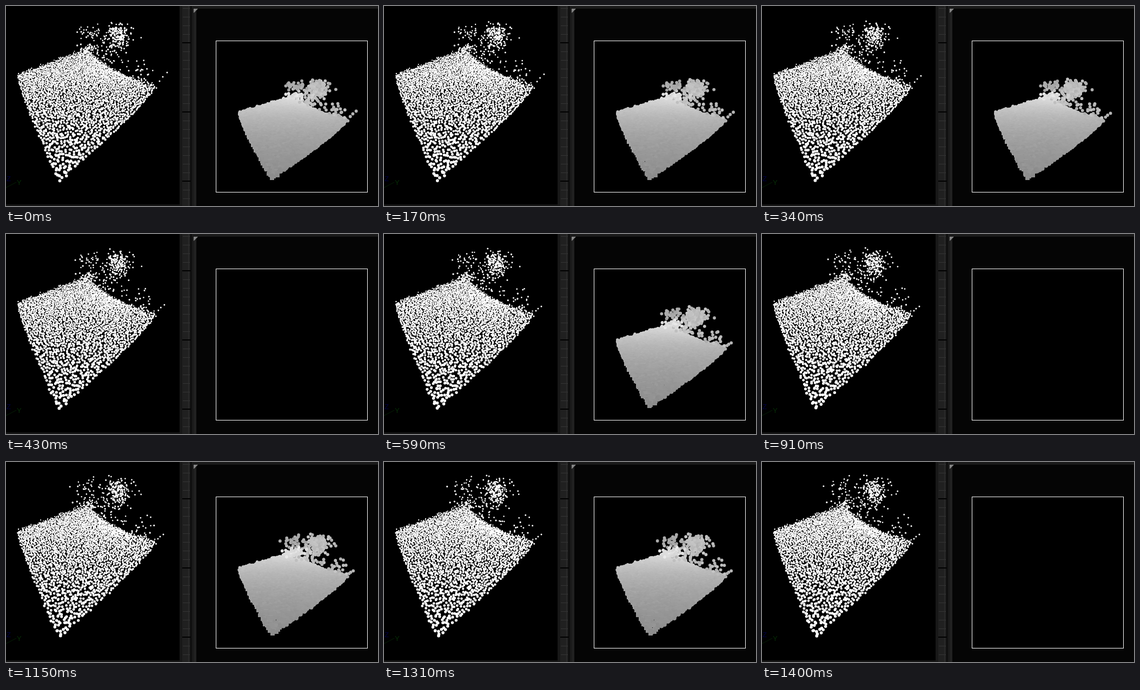
Write an HTML page with a canvas that moves like this. It is 688 px wide and 370 px high and loops after 1.48 s.

```html
<!DOCTYPE html>
<html lang="en">
<head>
<meta charset="utf-8">
<title>Point cloud and depth view</title>
<style>
  html, body { margin: 0; width: 100%; height: 100%; overflow: hidden; background: #000; }
  canvas { display: block; width: 688px; height: 370px; }
</style>
</head>
<body>
<canvas id="stage" width="688" height="370"></canvas>
<script>
const ctx = document.getElementById('stage').getContext('2d');
const TAU = Math.PI * 2, LOOP = 1480, STEPS = 18, GRID = 66;
const LONG_STEPS = [0, 2, 4, 15];

let seed = 90127;
function rand() {
  seed = (seed + 0x6D2B79F5) | 0;
  let n = Math.imul(seed ^ (seed >>> 15), 1 | seed);
  n = (n + Math.imul(n ^ (n >>> 7), 61 | n)) ^ n;
  return ((n ^ (n >>> 14)) >>> 0) / 4294967296;
}
const spread = () => (rand() + rand() + rand() + rand() - 2) * 1.73;

// Perspective map from the unit square to the sheet's four corners.
function makeProjection([x0, y0], [x1, y1], [x2, y2], [x3, y3]) {
  const ax = x1 - x2, bx = x3 - x2, cx = x0 - x1 + x2 - x3;
  const ay = y1 - y2, by = y3 - y2, cy = y0 - y1 + y2 - y3;
  const det = ax * by - bx * ay;
  const g = (cx * by - bx * cy) / det, h = (ax * cy - cx * ay) / det;
  return (u, v) => {
    const w = 1 + g * u + h * v;
    return {
      x: ((x1 - x0 + g * x1) * u + (x3 - x0 + h * x3) * v + x0) / w,
      y: ((y1 - y0 + g * y1) * u + (y3 - y0 + h * y3) * v + y0) / w,
      w
    };
  };
}
const project = makeProjection([96, 329], [20, 127], [152, 79], [279, 149]);

const sheet = [];
for (let i = 0; i < GRID; i++) {
  for (let j = 0; j < GRID; j++) {
    const u = (i + 0.5 + (rand() - 0.5) * 0.85) / GRID;
    const v = (j + 0.5 + (rand() - 0.5) * 0.85) / GRID;
    const p = project(u, v);
    p.x -= 4 * Math.sin(Math.PI * u) * (1 - v) ** 2;
    p.y += 8 * Math.sin(Math.PI * v) * (1 - u) ** 2 + 14 * Math.sin(Math.PI * u) * v ** 5;
    const rough = Math.max(u, v) ** 8;
    p.x += spread() * rough;
    p.y += spread() * 2.2 * rough;
    p.phase = rand() * TAU;
    p.sway = 1.5 / p.w;
    p.r = Math.max(0.9, 2.95 / p.w);
    p.block = v < 0.07 && p.w < 1.7;
    p.gray = Math.round(141 + (p.w - 1) * 39 + spread() * 2);
    sheet.push(p);
  }
}
sheet.sort((a, b) => b.w - a.w);

const drops = [];
function addDrops(count, x, y, sx, sy, vx, vy, gray) {
  for (let i = 0; i < count; i++) {
    drops.push({
      x: x + spread() * sx, y: y + spread() * sy,
      vx: vx + spread() * 5, vy: vy + spread() * 4,
      phase: rand() * TAU, sway: 1.5, r: 1.2 + rand() * 0.5,
      gray: Math.round(gray + spread() * 7)
    });
  }
}
addDrops(95, 207, 53, 17, 13, 0, -1, 186);
addDrops(85, 207, 57, 8, 9, 0, 0, 190);
addDrops(32, 157, 50, 11, 6, -4, -1, 172);
addDrops(48, 196, 84, 17, 13, 0, 1, 192);
addDrops(26, 248, 121, 17, 10, 2, 2, 184);
addDrops(45, 152, 78, 9, 4, 0, 0, 222);

function tip(t) {
  const k = Math.min(1, t / 0.59);
  return [[298, 123], [290, 131], [284, 139]].map(([x, y], i) => ({
    x: x - (7 - i * 2) * k, y: y + (11 - i * 4) * k, r: 1.5, gray: 180
  }));
}

function pose(p, t) {
  return {
    ...p,
    x: p.x + (p.vx || 0) * t + p.sway * Math.sin(p.phase + t * 3.2),
    y: p.y + (p.vy || 0) * t + p.sway * 0.7 * Math.cos(p.phase * 2 + t * 2.7)
  };
}

function box(color, x, y, w, h) {
  ctx.fillStyle = color;
  ctx.fillRect(x, y, w, h);
}

function line(color, x1, y1, x2, y2) {
  ctx.strokeStyle = color;
  ctx.beginPath();
  ctx.moveTo(x1, y1);
  ctx.lineTo(x2, y2);
  ctx.stroke();
}

function drawFrame() {
  ctx.lineWidth = 1;
  box('#000', 0, 0, 688, 370);
  box('#151515', 0, 367, 322, 3);
  box('#181818', 321, 0, 5, 370);
  box('#202020', 326, 0, 15, 370);
  for (let y = 4; y < 370; y += 16) box('#353535', 327, y, 13, 1);
  box('#303030', 337, 0, 1, 370);
  for (let y = 67; y < 370; y += 128) box('#000', 326, y, 15, 2);
  box('#080808', 341, 0, 2, 370);
  box('#1a1a1a', 343, 0, 345, 5);
  box('#191919', 343, 0, 4, 370);
  box('#212121', 347, 5, 5, 365);
  box('#050505', 352, 5, 336, 365);
  ctx.fillStyle = '#858585';
  ctx.beginPath();
  ctx.moveTo(347, 5);
  ctx.lineTo(355, 5);
  ctx.lineTo(347, 13);
  ctx.fill();
  box('#000', 388, 64, 281, 281);
  ctx.strokeStyle = '#fff';
  ctx.strokeRect(388.5, 64.5, 280, 280);

  line('#062006', 0, 336, 19, 326);
  ctx.font = '13px "Liberation Sans", Arial, sans-serif';
  ctx.fillStyle = '#000044';
  ctx.fillText('Z', 1, 324);
  ctx.fillStyle = '#062c06';
  ctx.fillText('Y', 20, 331);
}

function drawCloud(points) {
  ctx.fillStyle = '#fff';
  ctx.beginPath();
  for (const p of points) {
    ctx.moveTo(p.x + p.r, p.y);
    ctx.arc(p.x, p.y, p.r, 0, TAU);
  }
  ctx.fill();
}

function drawDepth(points) {
  for (const p of points) {
    const x = 430 + (p.x - 20) * 0.783, y = 197 + (p.y - 127) * 0.625;
    const r = p.w ? Math.max(2.2, 4.3 / Math.sqrt(p.w)) : 2.9;
    ctx.fillStyle = `rgb(${p.gray},${p.gray},${p.gray})`;
    if (p.block) {
      ctx.fillRect(Math.round(x - r), Math.round(y - r), 8, 7);
    } else {
      ctx.beginPath();
      ctx.arc(x, y, r, 0, TAU);
      ctx.fill();
    }
  }
}

function stepAt(ms) {
  let start = 0;
  for (let k = 0; k < STEPS; k++) {
    const length = LONG_STEPS.includes(k) ? 90 : 80;
    if (ms < start + length) return { k, start };
    start += length;
  }
  return { k: 0, start: 0 };
}

let shown = -1;
function render(now) {
  const { k, start } = stepAt(now % LOOP);
  if (k !== shown) {
    shown = k;
    const t = start / 1000;
    const points = [...sheet, ...drops].map(p => pose(p, t)).concat(tip(t));
    drawFrame();
    drawCloud(points);
    if (k % 6 !== 5) drawDepth(points);
  }
}

const begin = performance.now();
function tick() {
  render(performance.now() - begin);
  requestAnimationFrame(tick);
}
tick();
</script>
</body>
</html>
```
